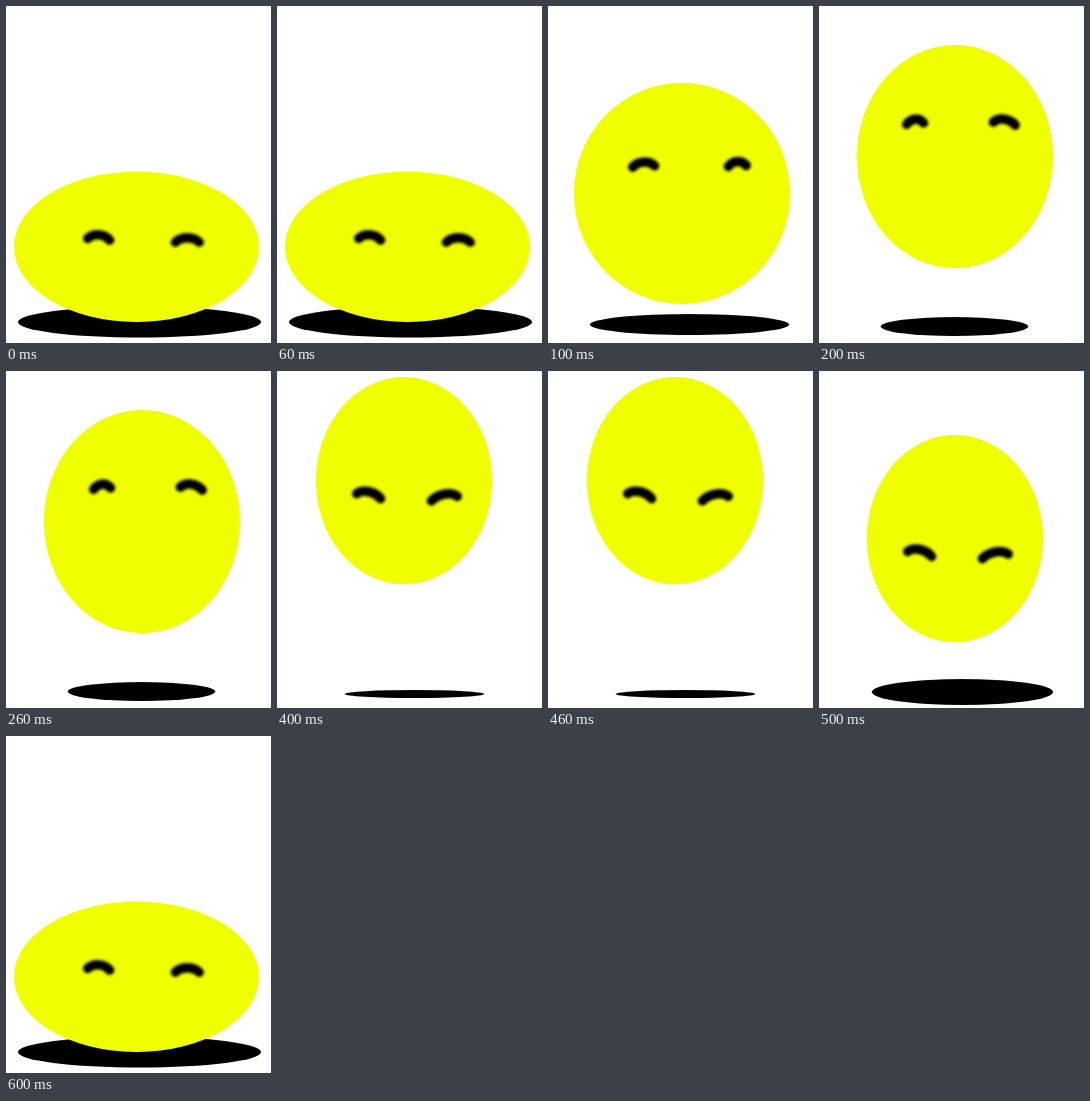
Write an HTML page with a canvas that moves like this. It is 266 px wide and 338 px high and loops after 0.7 s.

```html
<!DOCTYPE html>
<html lang="en">
<head>
<meta charset="utf-8">
<title>Bouncing ball</title>
<style>
html, body { margin: 0; width: 100%; height: 100%; overflow: hidden; background: #fff; }
canvas { display: block; width: 266px; height: 338px; }
</style>
</head>
<body>
<canvas id="stage" width="266" height="338"></canvas>
<script>
const ctx = document.getElementById('stage').getContext('2d');
const STEP = 100;
const BEND = 4.5;

// Ovals: centre x, y, radius x, y. Eyes: centre x, y, half width, tilt.
const pose = (body, shadow, ...eyes) => ({ body, shadow, eyes });
const shift = ([x, y, ...rest], dx, dy) => [x + dx, y + dy, ...rest];

const squashPose = pose([131, 241.5, 123, 75.5], [134, 317, 122, 15.5],
  [93, 234, 11, 0.8], [182, 237, 12, 0]);
const risePose = pose([134.5, 188, 108.5, 111], [142, 319.5, 100, 10.5],
  [96, 161, 11, -0.7], [190, 160.5, 9, -0.5]);
const floatPose = pose([136.5, 151, 98.5, 112], [136, 321.5, 74, 9.5],
  [96.5, 118, 8.5, -0.7], [186, 118, 11, 1.5]);
const peakPose = pose([138, 67, 112, 61], [138.5, 324, 68.5, 4],
  [99, 54, 10, 0], [184.5, 57, 11.5, 0]);
const dropPose = pose([127.5, 110, 88.5, 104], [138, 324, 70, 4],
  [92, 125.5, 12, 2.5], [168, 128, 13, -2.3]);
// The falling ball keeps its shape and slides down.
const fallPose = pose(shift(dropPose.body, 9, 58), [144, 322, 91, 13],
  ...dropPose.eyes.map(eye => shift(eye, 9, 58)));

const poses = [squashPose, risePose, floatPose, peakPose, dropPose, fallPose, squashPose];

function oval([x, y, rx, ry], color) {
  ctx.fillStyle = color;
  ctx.beginPath();
  ctx.ellipse(x, y, rx, ry, 0, 0, Math.PI * 2);
  ctx.fill();
}

function drawEye([x, y, half, tilt]) {
  const lift = BEND * 4 / 3;
  ctx.beginPath();
  ctx.moveTo(x - half, y - tilt);
  ctx.bezierCurveTo(x - half / 2, y - lift - tilt / 2,
    x + half / 2, y - lift + tilt / 2, x + half, y + tilt);
  ctx.stroke();
}

function draw(time) {
  const { body, shadow, eyes } = poses[Math.floor(time / STEP) % poses.length];
  ctx.fillStyle = '#fff';
  ctx.fillRect(0, 0, 266, 338);
  oval(shadow, '#000');
  oval(body, '#f0ff00');
  ctx.save();
  ctx.filter = 'blur(1.5px)';
  ctx.strokeStyle = '#000';
  ctx.lineWidth = 9.5;
  ctx.lineCap = 'round';
  eyes.forEach(drawEye);
  ctx.restore();
}

const start = performance.now();
function tick() {
  draw(performance.now() - start);
  requestAnimationFrame(tick);
}
tick();
</script>
</body>
</html>
```
